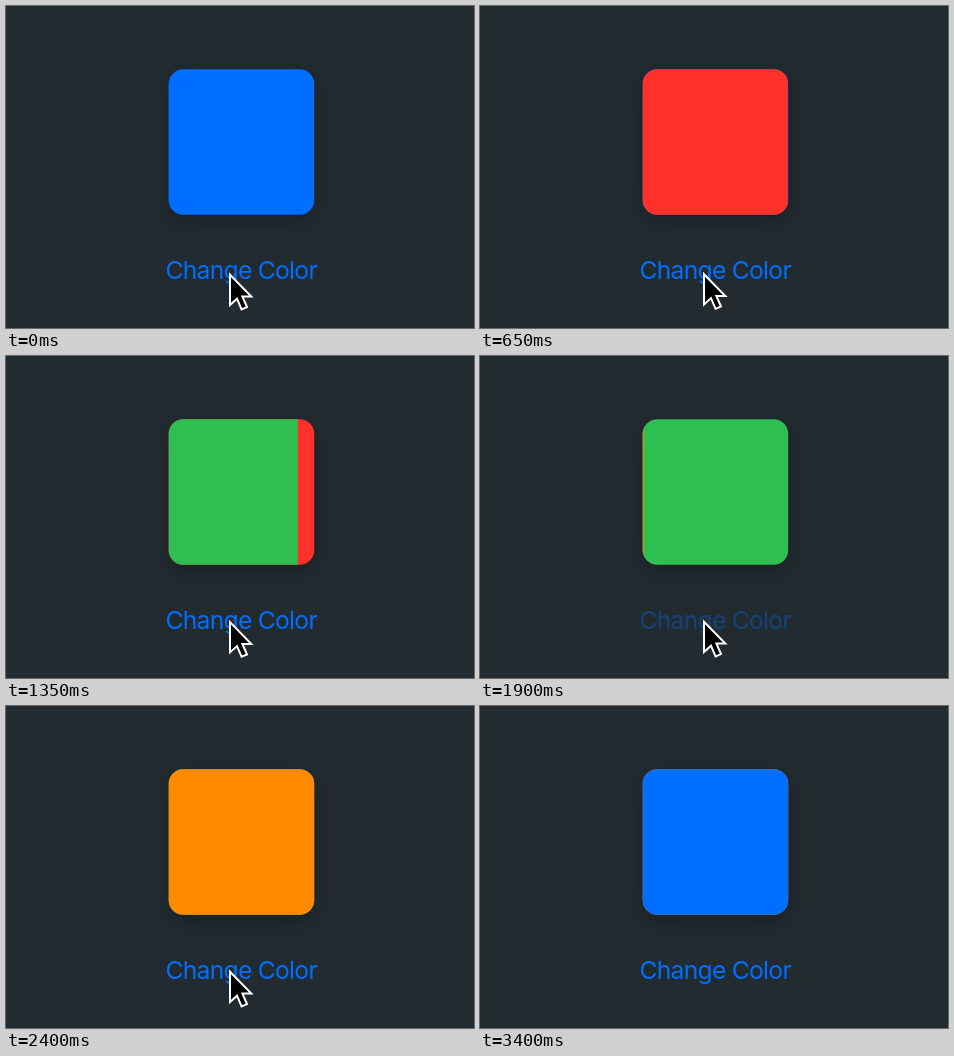
An HTML page for the animation above (3600 ms loop, 468x322 px).

```html
<!DOCTYPE html>
<html lang="en">
<head>
<meta charset="utf-8">
<title>Change Color</title>
<style>
  html, body { margin: 0; width: 100%; height: 100%; overflow: hidden; background: #222b30; }
  svg { display: block; }
  text { font: 24.65px Inter, "Open Sans", sans-serif; letter-spacing: -.72px; }
</style>
</head>
<body>
<svg width="468" height="322" viewBox="0 0 468 322">
  <defs>
    <filter id="soft" x="-40%" y="-40%" width="180%" height="180%">
      <feGaussianBlur stdDeviation="11"/>
    </filter>
    <clipPath id="card"><rect x="162.7" y="63.2" width="145.5" height="145.5" rx="14.5"/></clipPath>
  </defs>
  <rect x="162.7" y="70" width="145.5" height="145.5" rx="14.5" opacity=".24" filter="url(#soft)"/>
  <g clip-path="url(#card)">
    <rect id="base" x="162" y="63" width="147" height="147"/>
    <rect id="wipe" x="162" y="63" height="147"/>
  </g>
  <text id="label" x="235.2" y="273.2" text-anchor="middle" fill="#006fff">Change Color</text>
  <path id="cursor" d="M0 0V30.2L7 23.9L11.6 34.6L17 32.3L12.4 21.8H21.3Z"
        stroke="#fff" stroke-width="2"/>
</svg>
<script>
const LOOP = 3600, STEP = 50, WIPE = 500, DIM = 0.2;
const blue = '#006fff';
const clicks = [
  { press: 0, release: 169, color: '#ff3129' },
  { press: 760, release: 967, color: '#2fbf51' },
  { press: 1660, release: 1872, color: '#ff8a00' },
  { press: 2660, release: 2885, color: blue }
];
const [base, wipe, label, cursor] =
  ['base', 'wipe', 'label', 'cursor'].map(id => document.getElementById(id));

const progress = (t, from, to) => Math.min(1, Math.max(0, (t - from) / (to - from)));

// cubic-bezier(.42, 0, .58, 1)
function easeInOut(x) {
  let low = 0, high = 1, u = x;
  for (let i = 0; i < 20; i++) {
    u = (low + high) / 2;
    const bx = 1.26 * u * (1 - u) ** 2 + 1.74 * u * u * (1 - u) + u ** 3;
    if (bx < x) low = u; else high = u;
  }
  return u * u * (3 - 2 * u);
}

function draw(t) {
  let under = blue, over = blue, part = 0, opacity = 1;
  for (const { press, release, color } of clicks) {
    if (t >= release) {
      under = over;
      over = color;
      part = easeInOut(progress(t, release, release + WIPE));
    }
    if (t >= press) {
      const down = progress(t, press, release);
      const up = 1 - (1 - progress(t, release, release + 290)) ** 2;
      opacity = 1 - (1 - DIM) * down * (1 - up);
    }
  }
  base.setAttribute('fill', under);
  wipe.setAttribute('fill', over);
  wipe.setAttribute('width', part > 0.9995 ? 147 : part * 145.5 + 0.7);
  label.setAttribute('opacity', opacity);

  const drift = 2 * progress(t, 500, 1000) + progress(t, 1100, 1500);
  const leave = 62 * progress(t, 3200, 3400) ** 2;
  cursor.setAttribute('transform', `translate(224 ${268.8 - drift + leave})`);
}

function tick() {
  draw(Math.floor(performance.now() % LOOP / STEP) * STEP);
  requestAnimationFrame(tick);
}
tick();
</script>
</body>
</html>
```
